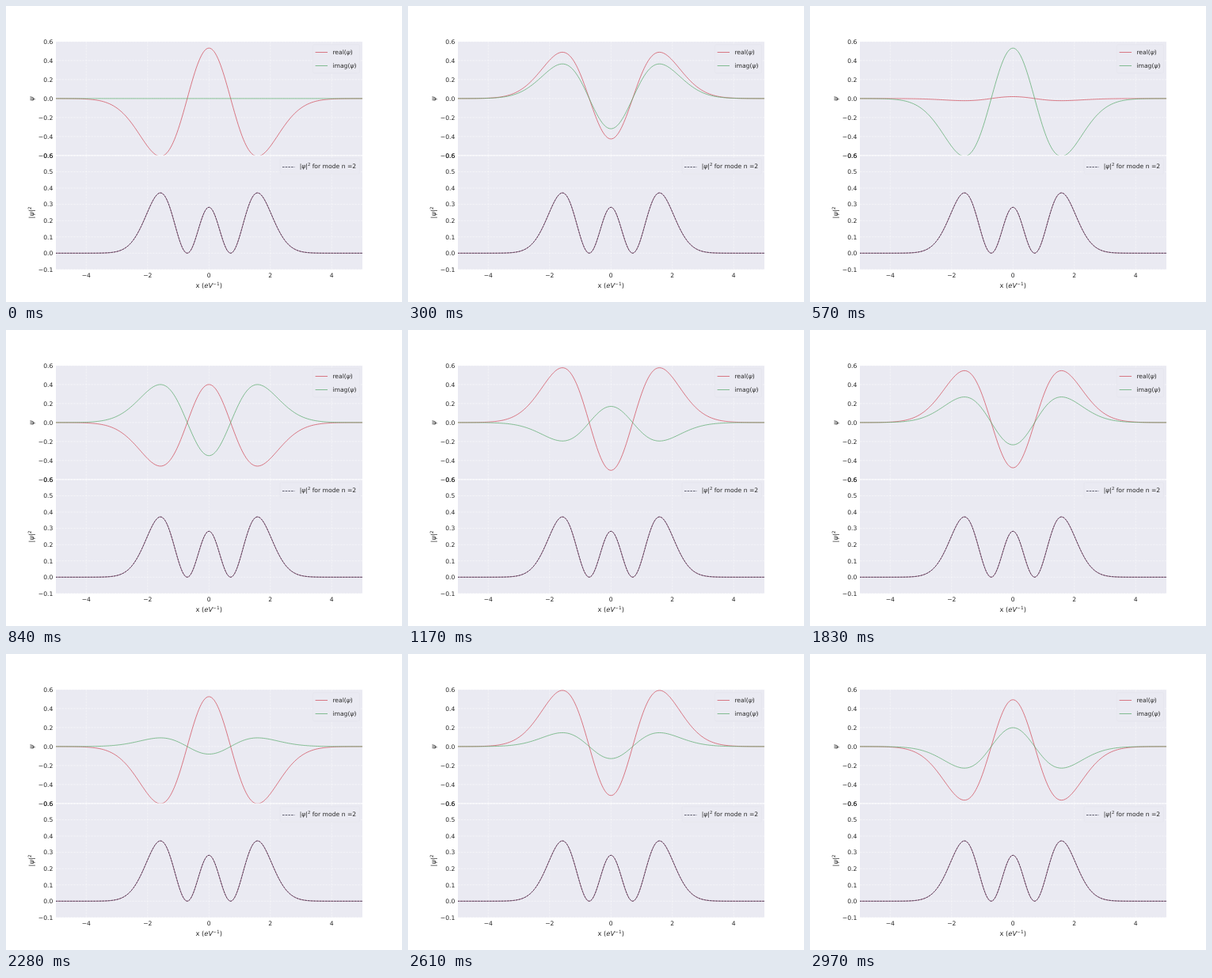
Animation of 500x374 px, one loop 3000 ms. Source, as an HTML page:

```html
<!DOCTYPE html>
<html lang="en">
<head>
<meta charset="utf-8">
<title>Oscillator mode</title>
<style>
html, body { margin: 0; width: 100%; height: 100%; overflow: hidden; background: #fff; }
svg { display: block; width: 500px; height: 374px; }
text { font: 7.64px "DejaVu Sans", sans-serif; fill: #262626; text-rendering: geometricPrecision; }
.label { font-size: 8.33px; }
.it { font-style: italic; }
.sup { font-size: 70%; }
path, line { fill: none; stroke-width: .7; }
.grid { stroke: #fff; stroke-dasharray: 2.6 1.1; opacity: .6; }
.real { stroke: #d04653; }
.imag { stroke: #55a868; }
.base { stroke: #a04a72; }
.dash { stroke: #26263a; stroke-dasharray: 2.57 1.11; }
.box { fill: #eaeaf2; stroke: #e3e3eb; stroke-width: .6; }
</style>
</head>
<body>
<svg viewBox="0 0 500 374">
  <defs>
    <clipPath id="top"><rect x="63" y="45" width="387" height="143.6"/></clipPath>
    <clipPath id="bottom"><rect x="63" y="189" width="387" height="144"/></clipPath>
  </defs>
  <rect x="63" y="45" width="387" height="288" fill="#eaeaf2"/>
  <g id="axes"></g>
  <line x1="63" y1="188.9" x2="450" y2="188.9" stroke="#fff"/>
  <g clip-path="url(#top)">
    <path id="real" class="real"/>
    <path id="imag" class="imag"/>
  </g>
  <g clip-path="url(#bottom)">
    <path id="base" class="base"/>
    <path id="dash" class="dash"/>
  </g>

  <rect class="box" x="387.5" y="48.7" width="58.8" height="36" rx="1.5"/>
  <line class="real" x1="390.6" y1="58.5" x2="406" y2="58.5"/>
  <line class="imag" x1="390.6" y1="75.5" x2="406" y2="75.5"/>
  <text x="412.4" y="61">real(<tspan class="it">ψ</tspan>)</text>
  <text x="412.4" y="78">imag(<tspan class="it">ψ</tspan>)</text>
  <rect class="box" x="346" y="192.7" width="100.3" height="19.5" rx="1.5"/>
  <line class="dash" x1="349" y1="203.5" x2="364.4" y2="203.5"/>
  <text x="370.7" y="205.2">|<tspan class="it">ψ</tspan>|<tspan class="sup" dy="-2.8">2</tspan><tspan dy="2.8"> for mode n =2</tspan></text>

  <text class="label" x="256.2" y="356" text-anchor="middle">x (<tspan class="it">eV</tspan><tspan class="sup" dy="-3">−1</tspan><tspan dy="3">)</tspan></text>
  <text class="label it" transform="translate(34.5 117.3) rotate(-90)" text-anchor="middle">ψ</text>
  <text class="label" transform="translate(34.5 261) rotate(-90)" text-anchor="middle">|<tspan class="it">ψ</tspan>|<tspan class="sup" dy="-3">2</tspan></text>
</svg>
<script>
const STEP = 30, STEPS = 100, PHASE = 0.25, SAMPLES = 240;
const $ = id => document.getElementById(id);
const px = x => 256.25 + x * 38.75;
const topY = v => 116.9 - v * 120;
const bottomY = v => 312.3 - v * 205.7;
const wave = x => (1 - 2 * x * x) * Math.exp(-x * x / 2) / Math.SQRT2 / Math.PI ** 0.25;

function curve(fn, toY) {
  let d = "";
  for (let i = 0; i <= SAMPLES; i++) {
    const x = -5 + 10 * i / SAMPLES;
    d += (i ? "L" : "M") + px(x).toFixed(2) + " " + toY(fn(x)).toFixed(2);
  }
  return d;
}

const minus = s => s.replace("-", "−");
const gridLine = (x1, y1, x2, y2) =>
  `<line class="grid" x1="${x1}" y1="${y1}" x2="${x2}" y2="${y2}"/>`;

function yTick(v, y) {
  return gridLine(63, y, 450, y) +
    `<text x="59.3" y="${y + 2.8}" text-anchor="end">${minus(v.toFixed(1))}</text>`;
}

let marks = "";
for (let i = -3; i <= 3; i++) marks += yTick(i / 5, topY(i / 5));
for (let i = -1; i <= 6; i++) marks += yTick(i / 10, bottomY(i / 10));
for (let x = -4; x <= 4; x += 2) {
  marks += gridLine(px(x), 45, px(x), 333) +
    `<text x="${px(x)}" y="343" text-anchor="middle">${minus(String(x))}</text>`;
}
$("axes").innerHTML = marks;

const density = curve(x => wave(x) ** 2, bottomY);
$("base").setAttribute("d", density);
$("dash").setAttribute("d", density);

function draw(step) {
  const angle = -PHASE * step;
  const re = Math.cos(angle), im = Math.sin(angle);
  $("real").setAttribute("d", curve(x => wave(x) * re, topY));
  $("imag").setAttribute("d", curve(x => wave(x) * im, topY));
}

const start = performance.now();
let shown = 0;
function tick() {
  const step = Math.floor((performance.now() - start) / STEP) % STEPS;
  if (step !== shown) draw(shown = step);
  requestAnimationFrame(tick);
}
draw(0);
requestAnimationFrame(tick);
</script>
</body>
</html>
```
